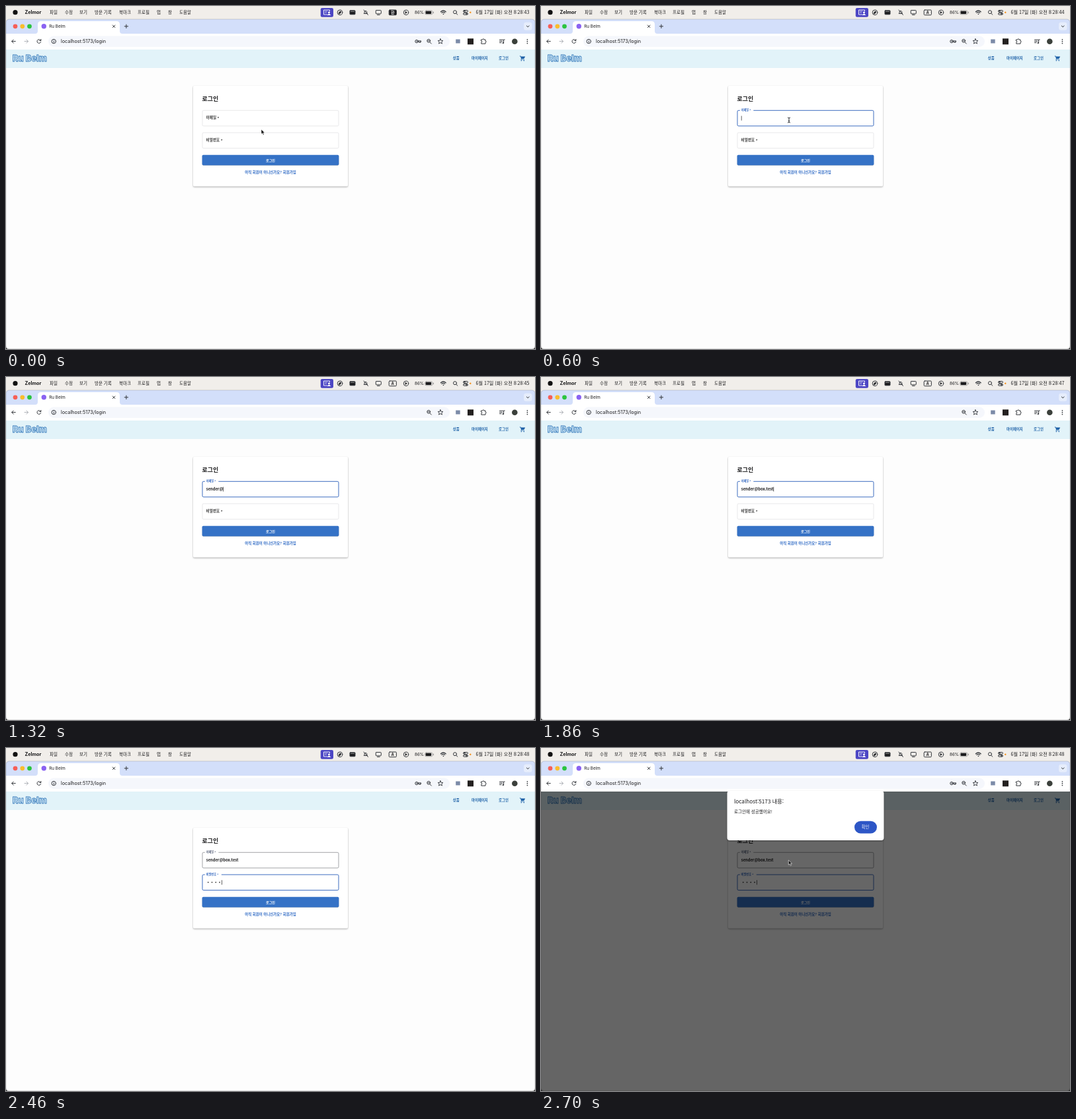
An HTML page for the animation above (2.88 s loop, 800x520 px).

```html
<!DOCTYPE html>
<html lang="ko">
<head>
<meta charset="utf-8">
<title>로그인</title>
<style>
  html, body { margin: 0; width: 100%; height: 100%; overflow: hidden; background: #fdfdfd; }
  svg { display: block; width: 100vw; height: 100vh; }
  text { font-family: "Noto Sans CJK KR", "Noto Sans CJK", "Noto Sans", sans-serif; fill: #1c1c1e; white-space: pre; }
  .menu { font-size: 6.5px; font-weight: 500; }
  .latin { font-family: Inter, Roboto, sans-serif; }
  .nav { font-size: 5.4px; font-weight: 800; fill: #1f62a8; }
  .mid { text-anchor: middle; }
  .line { fill: none; stroke: #33363b; stroke-width: 1; stroke-linecap: round; stroke-linejoin: round; }
  .input { font-size: 5.8px; font-weight: 700; }
  .box { fill: #fff; }
  .shadow { filter: drop-shadow(0 1px 1px #0005); }
</style>
</head>
<body>
<svg viewBox="0 0 800 520">
  <defs>
    <clipPath id="pageClip"><rect y="66" width="800" height="454"/></clipPath>
  </defs>

  <!-- system menu bar -->
  <rect width="800" height="26" fill="#f1eeea"/>
  <circle cx="14" cy="9.7" r="3.6" fill="#111"/>
  <text class="latin" x="28.5" y="12.3" font-size="7.2" font-weight="700">Zelmor</text>
  <g id="menus" class="menu"></g>
  <rect x="475.8" y="3" width="19.2" height="13.7" rx="2.2" fill="#4c46c4"/>
  <g fill="none" stroke="#fff" stroke-width=".9">
    <path d="M486 13h-5.5v-7h9v2"/><path d="M482 8h4M482 10h3" stroke-width=".6"/>
    <circle cx="488.5" cy="9.8" r="1.1" fill="#fff"/><path d="M486.3 13.5q2.2-3 4.4 0z" fill="#fff"/>
  </g>
  <g class="line">
    <circle cx="505" cy="9.8" r="3.8"/><path d="M503.2 11.7l1-2.8 2.7-1-1 2.8z" fill="#222"/>
    <rect x="520" y="6.8" width="8" height="6" rx=".8" fill="#1c1c1e"/><path d="M521.5 8.3h5" stroke="#ddd" stroke-width=".6"/>
    <path d="M541.5 11.5h5l-.8-1.5V8.5a2 2 0 0 0-3.6 0V10zM541 6l6.5 7.5"/>
    <rect x="559.3" y="6.5" width="8" height="5.3" rx=".8"/><path d="M561.5 13.4h3.6"/>
    <rect id="sourceBox" x="579.2" y="6" width="11.2" height="7.7" rx="1.2"/>
    <circle cx="605" cy="9.8" r="3.7"/><path d="M604 8.2l2.7 1.6-2.7 1.6z" fill="#222" stroke-width=".5"/>
    <rect x="633.8" y="7" width="11" height="5.8" rx="1.6" stroke="#888" stroke-width=".7"/>
    <path d="M646.3 9v1.8" stroke="#888"/>
    <path d="M657.4 8.8q3.9-3.6 7.8 0M658.9 10.4q2.4-2.1 4.8 0" stroke-width="1.2"/><circle cx="661.3" cy="12.2" r=".4"/>
    <circle cx="679" cy="9.2" r="2.5"/><path d="M680.9 11.2l2 2"/>
    <rect x="691.5" y="6.5" width="7" height="2.6" rx="1.3"/><rect x="691.5" y="10.6" width="7" height="2.6" rx="1.3"/>
    <path d="M693 7.8h1M696 11.9h1" stroke-width="1.6"/>
  </g>
  <rect x="634.6" y="7.8" width="8.6" height="4.2" rx="1" fill="#1c1c1e"/>
  <circle cx="702.3" cy="9.8" r="1.2" fill="#f5931e"/>
  <text id="source" class="mid" x="584.8" y="12.1" font-size="6" font-weight="700"></text>
  <text class="latin" x="618" y="12.1" font-size="6.3">86%</text>
  <text id="clock" x="710.5" y="12.4" font-size="7.1" font-weight="500"></text>

  <!-- browser tabs and toolbar -->
  <path d="M0 66V25q0-5 5-5h790q5 0 5 5v41z" fill="#d3dffa"/>
  <circle cx="14" cy="30.8" r="3.4" fill="#f65f57"/>
  <circle cx="24.8" cy="30.8" r="3.4" fill="#f9bd2e"/>
  <circle cx="35.5" cy="30.8" r="3.4" fill="#2bc440"/>
  <path d="M0 66V42h44q4 0 4-4V28q0-5 5-5h114q5 0 5 5v10q0 4 4 4h624v24z" fill="#fff"/>
  <circle cx="57.3" cy="30.8" r="3.7" fill="#8a62f2"/>
  <text class="latin" x="65.3" y="33.1" font-size="6.3">Ru Belm</text>
  <path class="line" d="M161.3 29l3.6 3.6m0-3.6l-3.6 3.6M179.2 30.8h5.4m-2.7-2.7v5.4"/>
  <rect x="783" y="24.8" width="12.5" height="12" rx="3.5" fill="#e6edfc"/>
  <path class="line" d="M787.3 30l1.9 1.8 1.9-1.8"/>
  <rect x="64" y="45.5" width="607" height="16.5" rx="8.2" fill="#f5f7fc"/>
  <g class="line">
    <path d="M14.3 53.6H8.8m2.5-2.6l-2.6 2.6 2.6 2.6"/>
    <path d="M28 53.6h5.5M31 51l2.6 2.6-2.6 2.6" stroke="#aeb1b7"/>
    <path d="M52.5 52.2a2.9 2.9 0 1 0 .2 2.3M52.9 50.5v2h-2"/>
    <circle cx="72.3" cy="53.6" r="3.2"/><path d="M72.3 53.4v1.8M72.3 51.8v.1"/>
    <circle cx="639.2" cy="52.8" r="2.4"/><path d="M641 54.8l2.3 2.3M638 52.8h2.4"/>
    <path d="M657 49.7l1.1 2.6 2.8.2-2.1 1.8.7 2.8-2.5-1.5-2.5 1.5.7-2.8-2.1-1.8 2.8-.2z" stroke-width=".9"/>
    <path d="M718.8 51h2a1.1 1.1 0 0 1 2.2 0h2v2a1.1 1.1 0 0 1 0 2.2v2h-6.2v-2a1.1 1.1 0 0 0 0-2.2z"/>
    <path d="M746.5 51.2h5M746.5 53.4h4M746.5 55.6h2.5M752.6 56v-5h1.6"/><circle cx="751.7" cy="56" r=".8"/>
  </g>
  <g id="key" class="line"><circle cx="621" cy="53.6" r="2.2"/><circle cx="621" cy="53.6" r=".3"/><path d="M623.3 52.8h4.2v1.8h-4.2M626 54.6v1"/></g>
  <rect x="680.2" y="50.5" width="6.5" height="6" fill="#7c8ba8"/>
  <rect x="698" y="49.3" width="9" height="9" fill="#23201f"/>
  <circle cx="769.3" cy="53.7" r="4.3" fill="#3b403b"/>
  <g fill="#33363b"><circle cx="788.4" cy="50.8" r=".85"/><circle cx="788.4" cy="53.7" r=".85"/><circle cx="788.4" cy="56.6" r=".85"/></g>
  <text class="latin" x="83" y="56.3" font-size="7.25">localhost:5173/login</text>

  <!-- page -->
  <rect y="66" width="800" height="454" fill="#fdfdfd"/>
  <rect y="66" width="800" height="28" fill="#e2f3f9"/>
  <text class="latin" x="9.8" y="84.3" font-size="13" style="font-weight:800;fill:#d5ecfa;stroke:#3479b9;stroke-width:.8">Ru Belm</text>
  <text class="nav" x="675.8" y="81.2">상품</text>
  <text class="nav" x="704" y="81.2">마이페이지</text>
  <text class="nav" x="745" y="81.2">로그인</text>
  <g fill="#1f62a8" transform="translate(776.5 74.8) scale(.4)">
    <path d="M1 2v2h2l3.6 7.6-1.4 2.4c-.7 1.3.3 3 1.8 3h12v-2H7.400l1.1-2h7.5c.7 0 1.4-.4 1.700-1l3.6-6.5c.4-.7-.1-1.5-.9-1.5H5.2l-.9-2z"/>
    <circle cx="7" cy="20" r="2"/><circle cx="17" cy="20" r="2"/>
  </g>

  <rect class="box shadow" x="283" y="121" width="234" height="152.6" rx="1.8"/>
  <text x="296.6" y="143.6" font-size="8.9" font-weight="800">로그인</text>
  <g id="fields"></g>
  <rect x="296.6" y="226.3" width="206.8" height="15.8" rx="1.8" fill="#0003"/>
  <rect x="296.6" y="225.7" width="206.8" height="15.7" rx="1.8" fill="#3572c6"/>
  <text class="mid" x="400" y="235.5" font-size="5.1" font-weight="700" style="fill:#fff">로그인</text>
  <text class="mid" x="400" y="254" font-size="5.45" font-weight="700" style="fill:#2c68c4">아직 회원이 아니신가요? 회원가입</text>

  <rect id="scrim" y="66" width="800" height="454" fill="#000" fill-opacity=".6"/>
  <path d="M0 516v4h4q-4 0-4-4zM800 516v4h-4q4 0 4-4z" fill="#222"/>
  <rect x="0" y="20" width="800" height="499.7" rx="5" fill="none" stroke="#0003" stroke-width=".7"/>
  <path id="arrow" d="M0 0v7.2l1.7-1.5 1.2 2.7 1.3-.6-1.2-2.6h2.3z" fill="#111" stroke="#fff" stroke-width=".6"/>
  <path id="beam" class="line" d="M-1.6-3.9q1.6 0 1.6 1.2v5.4q0 1.2-1.6 1.2M1.6-3.9q-1.6 0-1.6 1.2M0 2.7q0 1.2 1.6 1.2M-.8 1h1.6" stroke-width=".8"/>
  <g id="dialogClip">
    <g id="dialog">
      <path id="panel" class="shadow" fill="#fff" stroke="#fff" stroke-width="8" stroke-linejoin="round"/>
      <g id="message">
        <text x="292" y="84.2" font-size="8.2" font-weight="500">localhost:5173 내용:</text>
        <text x="292" y="99.4" font-size="6.5">로그인에 성공했어요!</text>
        <rect x="474" y="110.8" width="34" height="18.6" rx="9.3" fill="#2d56c6"/>
        <text class="mid" x="490.5" y="122.4" font-size="6.3" font-weight="500" style="fill:#fff">확인</text>
      </g>
    </g>
  </g>
</svg>

<script>
const LOOP = 2880, STEP = 60;
const EMAIL = "sender@box.test";
const FOCUS = 240, LATIN = 540, FIRST_KEY = 720, PASSWORD = 1980, ALERT = 2580;
const emailKeys = [720, 780, 840, 960, 1020, 1140, 1260, 1380, 1440, 1500, 1560, 1680, 1740, 1800, 1860];
const passwordKeys = [2040, 2100, 2160, 2280];
const seconds = [240, 840, 1380, 1860, 2460];

const $ = id => document.getElementById(id);
const set = (el, attrs) => Object.entries(attrs).forEach(([k, v]) => el.setAttribute(k, v));
const show = (el, on) => { el.style.display = on ? "" : "none"; };
const passed = (times, t) => times.filter(time => time <= t).length;
const clamp = x => Math.max(0, Math.min(1, x));
const mix = (a, b, p) => a + (b - a) * p;

function add(parent, tag, attrs, text = "") {
  const el = document.createElementNS("http://www.w3.org/2000/svg", tag);
  set(el, attrs);
  el.textContent = text;
  return parent.appendChild(el);
}

[["파일", 66], ["수정", 89], ["보기", 111], ["방문 기록", 134], ["북마크", 171],
 ["프로필", 199], ["탭", 228], ["창", 245], ["도움말", 262]]
  .forEach(([name, x]) => add($("menus"), "text", { x, y: 12.1 }, name));

function makeField(y, name, notchWidth) {
  const g = $("fields");
  const field = {
    y, notchWidth,
    frame: add(g, "rect", { x: 297, y: y + .3, width: 206, height: 23.6, rx: 1.8, fill: "#fff" }),
    notch: add(g, "rect", { x: 300.8, y: y - 1, height: 3, fill: "#fff" }),
    label: add(g, "text", { x: 302.6, "font-weight": 600 }, name + " "),
    value: add(g, "text", { class: "input", x: 302.8, y: y + 14 }),
    caret: add(g, "rect", { y: y + 8.6, width: .7, height: 7, fill: "#222" }),
  };
  add(field.label, "tspan", { dy: ".22em" }, "*");
  return field;
}
const email = makeField(158, "이메일", 20.5);
const password = makeField(191.7, "비밀번호", 25);
const dots = passwordKeys.map((_, i) =>
  add($("fields"), "circle", { cx: 305.7 + i * 5.8, cy: 203.6, r: .85, fill: "#222" }));

function drawField(field, raised, focused, filled, caretX) {
  set(field.frame, {
    stroke: focused ? "#3c6cbf" : filled ? "#8b8d92" : "#e2e3e5",
    "stroke-width": focused ? 1 : .8,
  });
  set(field.notch, { width: field.notchWidth * raised });
  set(field.label, { y: field.y + mix(13.1, .9, raised), "font-size": mix(5.6, 4.2, raised) });
  field.label.style.fill = focused ? "#2c62bd" : filled ? "#555f78" : "#333";
  set(field.caret, { x: caretX });
  show(field.caret, focused);
}

function drawPointer(t) {
  const reach = clamp(t / 240), settle = clamp((t - 300) / 180);
  const ease = reach * reach * (3 - 2 * reach);
  const x = mix(mix(386, 377, ease), 375, settle);
  const y = mix(mix(187, 162, ease), 173, settle);
  const inField = y < 181;
  const alert = t >= ALERT;
  set($("arrow"), { transform: alert ? "translate(374.3 170)" : `translate(${x} ${y})` });
  set($("beam"), { transform: `translate(${x} ${y})` });
  show($("arrow"), alert || !inField);
  show($("beam"), inField && t < FIRST_KEY);
}

function drawAlert(t) {
  show($("scrim"), t >= ALERT);
  show($("dialog"), t >= ALERT);
  const away = t < 2640 ? 1 : t < 2700 ? .3 : 0;
  const inset = 4 * away, top = mix(69, 62, away), bottom = mix(136, 128, away);
  set($("dialogClip"), { "clip-path": away ? "url(#pageClip)" : "none" });
  set($("dialog"), { opacity: mix(1, .27, away) });
  set($("panel"), { d: `M${285.5 + inset} ${top}H${514.5 - inset}L${514.5 - away} ${bottom}H${285.5 + away}z` });
  set($("message"), { transform: `translate(400 ${-9 * away}) scale(${1 - .04 * away} 1) translate(-400 0)` });
}

function drawMenuBar(t) {
  const latin = t >= LATIN;
  $("clock").textContent = `6월 17일 (화) 오전 8:28:${43 + passed(seconds, t)}`;
  $("source").textContent = latin ? "A" : "한";
  $("source").style.fill = latin ? "#1c1c1e" : "#fff";
  set($("sourceBox"), { fill: latin ? "none" : "#1c1c1e" });
}

function draw(t) {
  drawMenuBar(t);
  show($("key"), t < FIRST_KEY || t >= PASSWORD);

  email.value.textContent = EMAIL.slice(0, passed(emailKeys, t));
  const emailEnd = 302.8 + email.value.getComputedTextLength();
  drawField(email, clamp((t - FOCUS + STEP) / 120), t >= FOCUS && t < PASSWORD, t >= PASSWORD, emailEnd);

  const count = passed(passwordKeys, t);
  dots.forEach((dot, i) => show(dot, i < count));
  drawField(password, clamp((t - PASSWORD + STEP) / 120), t >= PASSWORD, false, 302.8 + count * 5.8);

  drawPointer(t);
  drawAlert(t);
}

const start = performance.now();
function tick() {
  const t = (performance.now() - start) % LOOP;
  draw(Math.floor(t / STEP) * STEP);
  requestAnimationFrame(tick);
}
tick();
</script>
</body>
</html>
```
